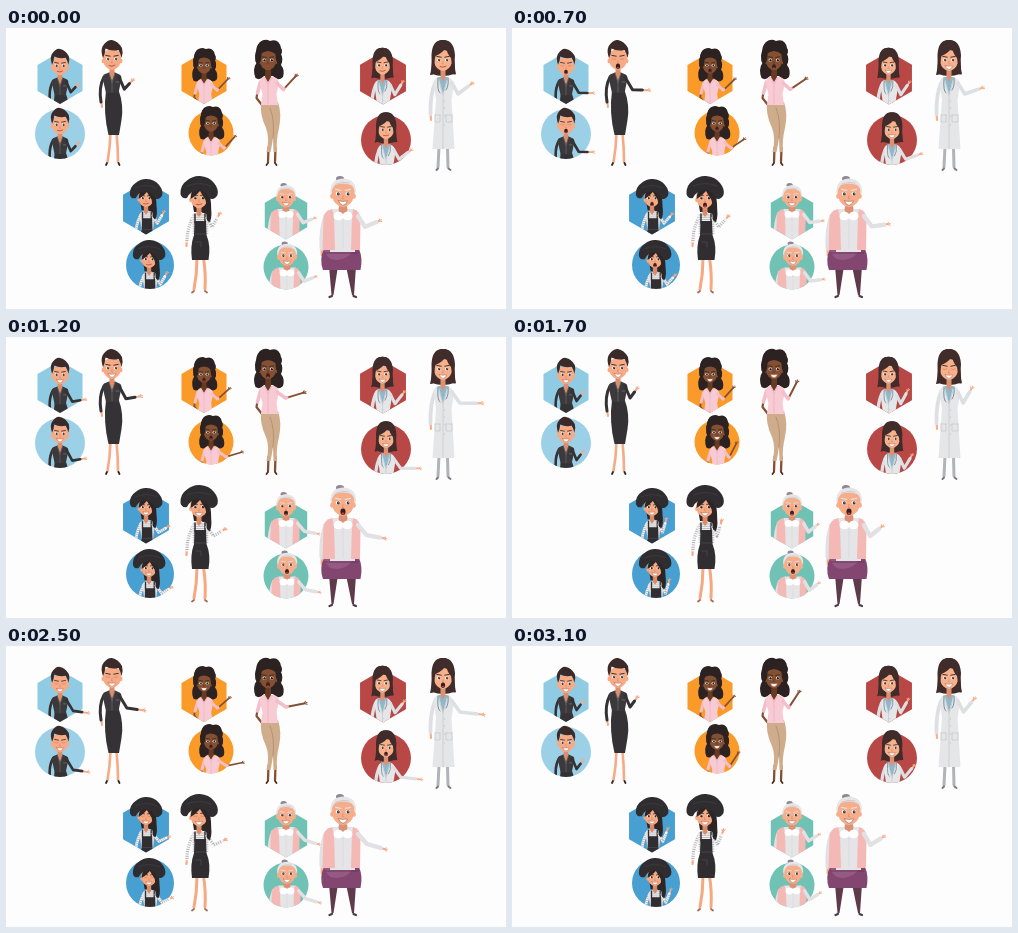
These frames come from a looping animation (500x281 px, 3200 ms). An HTML page with a canvas:

```html
<!DOCTYPE html>
<html lang="en">
<head>
<meta charset="utf-8">
<title>Character set</title>
<style>
  html, body { margin: 0; width: 100%; height: 100%; overflow: hidden; background: #fefdfe; }
  canvas { display: block; width: 500px; height: 281px; }
</style>
</head>
<body>
<canvas id="stage"></canvas>
<script>
const canvas = document.getElementById('stage');
const ctx = canvas.getContext('2d');
const ratio = Math.max(1, window.devicePixelRatio || 1);
canvas.width = 500 * ratio;
canvas.height = 281 * ratio;

const LOOP = 3200, STEP = 100, WAVE = 1500;
const DARK = '#2b282a';
const mix = (a, b, k) => a + (b - a) * k;
const mixPoint = (p, q, k) => [mix(p[0], q[0], k), mix(p[1], q[1], k)];
const within = (ranges, tick) => ranges.some(([from, to]) => tick >= from && tick <= to);

function fill(color, path) {
  ctx.fillStyle = color;
  ctx.fill(new Path2D(path));
}
function line(color, width, path, dash = []) {
  ctx.strokeStyle = color;
  ctx.lineWidth = width;
  ctx.lineCap = dash.length ? 'butt' : 'round';
  ctx.lineJoin = 'round';
  ctx.setLineDash(dash);
  ctx.stroke(new Path2D(path));
}
function oval(color, x, y, rx, ry = rx) {
  ctx.fillStyle = color;
  ctx.beginPath();
  ctx.ellipse(x, y, rx, ry, 0, 0, 7);
  ctx.fill();
}
function stripedLine(width, path) {
  line('#f3f3f5', width, path);
  line('#a5a4aa', width, path, [.7, 1.6]);
}

// Figures are drawn in stage coordinates; busts reuse them scaled about the head.
const people = [
  {
    head: [106, 32], scale: .88, skin: '#f6aa85', shade: '#dd8f6c', iris: '#4a3026',
    sleeve: '#343234', width: 3, cuff: .55, start: 150,
    arm: { shoulder: [113, 49], elbow: [[118, 61], [121, 62]], hand: [[126, 50], [140, 65.5]] },
    talk: [[6, 8], [21, 23]], blink: [[6, 7], [24, 25]],
    busts: [
      { shape: 'hex', x: 54, y: 50, r: 26, color: '#90cbe4', head: [54, 38.5] },
      { shape: 'circle', x: 54, y: 106, r: 25, color: '#9bd0e7', head: [54, 97.5] }
    ],
    back() {},
    body() {
      line(this.skin, 2, 'M95 72L96 79');
      line('#343234', 3, 'M98 49Q92.5 59 95 74');
      line(this.skin, 2.6, 'M104.5 105Q104 120 101.5 134M110.5 105Q112 120 112 134');
      line(DARK, 1.8, 'M101 135L100 137M112.5 135L113.5 137');
      fill('#343234', 'M100 63L112.5 62Q118 77 115.5 92L113 107H102.5Q97 84 100 63Z');
      fill('#3b393b', 'M103 44.5L98 46.5Q95.5 49 97.5 54L100 65L112.5 65L115 53Q116.5 48 113.5 46.5L109 44.5Z');
      fill(this.shade, 'M103.5 39H108.5V46L106 53L103.5 46Z');
      line('#777377', .6, 'M103 45L106 55L109 45M106 55V64');
      line('#8a8588', .6, 'M110 54H113');
    },
    hair() {
      fill('#3a2a29', 'M97 30Q94.5 23 96.5 18.5Q101 11 106 12Q112 13 116 20Q117.5 25 115.5 30Q114.5 25 112.5 22Q105 23.5 99.5 20.5Q99 26 97 30Z');
    }
  },
  {
    head: [262, 33], scale: .85, skin: '#855031', shade: '#673a21', iris: '#21130d',
    sleeve: '#f3bdca', width: 3.4, cuff: .06, start: 290, wide: .92,
    arm: { shoulder: [271, 55], elbow: [[276, 62], [280, 61]], hand: [[285, 43], [301, 57]] },
    talk: [[5, 13], [20, 27]], blink: [],
    busts: [
      { shape: 'hex', x: 198, y: 50, r: 26, color: '#fa9a29', head: [198, 38], reach: [.3, .45], talk: [[5, 13]] },
      { shape: 'circle', x: 205, y: 105, r: 22.5, color: '#fa9a29', head: [205, 96] }
    ],
    back() {
      fill('#2d2222', 'M263 13Q252 11 251 21Q247 28 251 34Q246 41 249.5 50Q254 53 258 48L267 48Q272 54 277 49Q279 42 275 37Q278 30 274 25Q274 12 263 13Z');
    },
    body() {
      line(this.skin, 2.2, 'M251.5 64L250.5 70L256 77');
      line('#f3bdca', 3.6, 'M254.5 54L251.5 65');
      line(this.skin, 2.3, 'M262.5 120L262 134M269.5 120L269 134');
      line('#4b2c1d', 1.8, 'M262 135L260.5 137M269 135L270.5 137');
      fill('#cfad8c', 'M255.5 74H272Q276 86 273 100Q270 112 271 124H267.5L267 110Q266 117 264.5 124H260.5Q264 110 260 100Q253 85 255.5 74Z');
      line('#aa866b', .7, 'M264 80Q269 92 267 110');
      fill('#f8cbd4', 'M257 49Q253 51 254 57L256.5 66L255 77H272L270.5 66L273 55Q272 50 268 49Z');
      fill(this.shade, 'M259.5 41H265V49L262 54L259 49Z');
      line('#e5aab8', .6, 'M258.5 49L262 56L266 49M262 56V76');
    },
    hair() {
      fill('#2d2222', 'M264 17Q258 20 255.5 26Q256 32 252.5 37Q247 33 250.5 27Q249 19 254 14Q259 10 264 13Q273 10 275 20Q277 23 275 27Q278 33 273 38Q269.5 33 269.5 27Q269 21 264 17Z');
    }
  },
  {
    head: [437, 33], scale: .87, skin: '#f8b08b', shade: '#de9170', iris: '#4b332b',
    sleeve: '#dedfe2', width: 3.6, cuff: .68, start: 290,
    arm: { shoulder: [446, 55], elbow: [[451, 66], [454, 66]], hand: [[460, 49], [479, 69]] },
    talk: [[24, 27]], blink: [[16, 17]],
    busts: [
      { shape: 'hex', x: 377, y: 50, r: 26.5, color: '#b84845', head: [376.5, 38], reach: [0, .15], talk: [], blink: [] },
      { shape: 'circle', x: 380, y: 112, r: 25, color: '#b84845', head: [380, 102.5], blink: [] }
    ],
    back() {
      fill('#402c2a', 'M437 12Q426 12 427 27Q425 40 426 46Q437 50 448 46Q450 39 447 27Q448 12 437 12Z');
    },
    body() {
      line(this.skin, 2.2, 'M424.5 84L425 92');
      line('#dedfe2', 3.8, 'M429 55Q424 67 424.5 86');
      line('#b0b3b7', 3, 'M433 119L432 139M441.5 119L442 139');
      line('#7c7a7e', 2, 'M432 140.5L430.5 142M442.5 140.5L444.5 142');
      fill('#e4e6e8', 'M432 49Q427 51 428 57L430 72L426.5 121H448.5L445.5 72L448 57Q447 51 442 49Z');
      fill('#8db9cc', 'M432.5 49H441.5L437 66Z');
      fill(this.shade, 'M434.5 42H439.5V49L437 54L434.5 49Z');
      line('#c0c0c5', .6, 'M432 50L437 67V121M442 50L437 67M429 87H434M440 87H446M429 87V94H434V87M440 87V94H446V87');
      line('#62788a', .8, 'M432 50Q431 64 434 65M442 50Q443 58 440 62');
      for (const y of [73, 80, 88, 97]) oval('#b5b5bb', 438.5, y, .5);
    },
    hair() {
      fill('#402c2a', 'M437 12Q426 12 425.5 27Q426 40 424 47Q429 47 430 42Q427.5 34 429.5 28Q437 25 440 19Q441 26 445 30Q446.5 37 444.5 43Q447 48 450 46Q448 38 449 27Q448 12 437 12Z');
    }
  },
  {
    head: [193, 171], scale: .87, skin: '#f6a880', shade: '#da8b67', iris: '#38241f',
    sleeve: '#f1f1f2', width: 3.2, cuff: .62, stripes: true, start: 290, wide: .94,
    arm: { shoulder: [201, 190], elbow: [[205, 199], [208, 199]], hand: [[209.5, 182], [221, 193]] },
    talk: [[6, 8], [21, 23]], blink: [[24, 25]],
    busts: [
      { shape: 'hex', x: 140, y: 180, r: 26.5, color: '#489fd1', head: [140, 171] },
      { shape: 'circle', x: 144, y: 237, r: 24, color: '#489fd1', head: [143, 232] }
    ],
    back() {
      fill('#2d2627', 'M184 160H203Q206 177 205 189L200 194L196 184H188Z');
    },
    body() {
      line(this.skin, 2.2, 'M181 211L180.5 218');
      stripedLine(3.2, 'M186.5 190Q181 201 181 213');
      line(this.skin, 3, 'M191 230Q191 246 188 261M197.5 230Q200 246 199 261');
      line('#a66a52', 1.8, 'M188 263L186 264.5M199 263L201 264.5');
      fill('#f1f1f2', 'M189 185Q184 187 186 194L188 207H201L203 191Q202 186 198 185Z');
      for (let y = 187; y < 207; y += 2.3) line('#a5a4aa', .7, `M187 ${y}H202`);
      fill('#302e30', 'M188.5 193H200L200.5 207Q205 218 202.5 232H186Q184 218 188 207Z');
      line('#302e30', 1.5, 'M189 186V195M199 186V195');
      line('#555156', .6, 'M189 206H200M190 214H195V219');
      fill(this.shade, 'M190.5 180H195.5V186L193 189L190.5 186Z');
    },
    hair() {
      fill('#2d2627', 'M185 167L187 159H199Q205 166 203.5 176Q207 187 204 194Q200 194 200.5 187Q201 178 199.5 172Q197 168 194 163Q190 168 184.5 171Z');
      fill('#302d30', 'M174.5 166Q174 157 181 152.5Q187 147.5 194 148Q203 148.5 208 155Q213 161 211.5 167Q208 173 203 170Q201 163 193 162Q185 162 181 170Q175.5 171 174.5 166Z');
      line('#454145', .7, 'M181 158Q193 153 205 158');
    }
  },
  {
    head: [337, 167], scale: .78, skin: '#f6ad8a', shade: '#dd9174', iris: '#4c393a',
    sleeve: '#e1e1e4', width: 4.4, cuff: .68, start: 290, wide: 1.22, old: true,
    arm: { shoulder: [352, 188], elbow: [[358, 199], [361, 198]], hand: [[371, 188], [381, 204]] },
    talk: [[11, 18]], blink: [[21, 22]],
    busts: [
      { shape: 'hex', x: 280, y: 187, r: 24.5, color: '#70c2b5', head: [280, 170] },
      { shape: 'circle', x: 280, y: 239, r: 22.5, color: '#70c2b5', head: [281, 228.5] }
    ],
    back() {
      oval('#8f8794', 334, 150.5, 4, 2.6);
      oval('#dddde0', 337, 163, 12.5, 12.5);
    },
    body() {
      line(this.skin, 2.8, 'M316 219V227');
      line('#e1e1e4', 5, 'M320 188Q315 201 316 220');
      fill('#5f3a4b', 'M323 238H332L327.5 267H325.5ZM340 238H350L348 267H346Z');
      line('#493b47', 2.2, 'M326 268L323.5 269M347.5 268L350 269');
      fill('#824670', 'M318 221H353Q357 230 354.5 242H317Q313 231 318 221Z');
      fill('#955a83', 'M318 222H347Q343 231 331 232Q321 232 318 222Z');
      line('#683457', .8, 'M319 225H352');
      fill('#e5e5e8', 'M326 181H348L349 224H324Z');
      fill('#f4b8b5', 'M326 181Q318 183 317.5 190L316.5 222H329L328 188Z');
      fill('#f4b8b5', 'M347 181Q354 183 354.5 190L354 222H345L346 188Z');
      oval(this.shade, 337, 181, 4.5, 5);
      oval('#fff', 332.5, 188, 5, 4.3);
      oval('#fff', 341.5, 188, 5, 4.3);
      line('#d4d4da', .6, 'M337 192V220');
    },
    hair() {
      fill('#e6e6e9', 'M325 166Q323 151 337 151Q351 151 350 166Q348 159 345 157Q337 154 329 157Q326 160 325 166Z');
      line('#b9b9c0', .6, 'M330 156Q337 153 343 155');
    }
  }
];

function drawArm(person, swing) {
  const { shoulder, elbow: elbows, hand: hands } = person.arm;
  const elbow = mixPoint(...elbows, swing);
  const bulge = 5 * swing * (1 - swing);
  const tip = mixPoint(...hands, swing);
  tip[0] += bulge;
  tip[1] -= bulge;
  const angle = Math.atan2(tip[1] - elbow[1], tip[0] - elbow[0]);
  const palm = [tip[0] - 3 * Math.cos(angle), tip[1] - 3 * Math.sin(angle)];
  const cuff = mixPoint(elbow, tip, person.cuff);
  line(person.skin, 2, `M${elbow}L${palm}`);
  for (const turn of [-.75, -.1, .45]) {
    const reach = turn < -.5 ? 2.4 : 3.2;
    line(person.skin, 1.1,
      `M${palm}l${reach * Math.cos(angle + turn)} ${reach * Math.sin(angle + turn)}`);
  }
  const sleeve = `M${shoulder}L${elbow}L${cuff}`;
  if (person.stripes) stripedLine(person.width, sleeve);
  else line(person.sleeve, person.width, sleeve);
}

function drawFace(person, talking, blinking, smirking) {
  ctx.save();
  ctx.translate(...person.head);
  ctx.scale(person.wide || 1, person.wide || 1);
  oval(person.skin, -9, 1, 1.5, 2.3);
  oval(person.skin, 9, 1, 1.5, 2.3);
  fill(person.skin, 'M-9-7Q0-15 9-7Q10 3 6 7Q0 13-6 7Q-10 3-9-7Z');
  for (const side of [-1, 1]) {
    const x = side * 4;
    if (blinking) line(person.shade, 1, `M${x - 2}-1q2 1.3 4 0`);
    else {
      oval('#fff', x, -1, 1.9, 1.7);
      oval(person.iris, x + .2, -.9, 1.2, 1.4);
      oval('#fff', x + .6, -1.4, .3);
    }
    line(person.old ? '#e3dfe0' : DARK, .9,
      `M${x - 2.2 * side}-3.8L${x + 2.2 * side}-4.6`);
  }
  line(person.shade, .8, 'M0 .5L-.5 3H.7');
  if (talking) {
    oval('#391d20', 0, 6.3, 2.1, 2.7);
    oval('#b94f50', 0, 7.8, 1.2, .8);
  } else if (smirking) line('#a64943', .9, 'M-3 5.6Q0 7.2 3 5.2');
  else {
    const smile = 'M-3.7 4.8Q0 5.7 3.7 4.8Q2.5 8.4 0 8.4Q-2.5 8.4-3.7 4.8Z';
    fill('#fff', smile);
    line('#a86153', .5, smile);
  }
  ctx.restore();
}

function drawHead(person, state, tick) {
  drawFace(person, within(state.talk || person.talk, tick),
    within(state.blink || person.blink, tick), tick < 3 && !person.old);
  person.hair();
}

function badgePath({ shape, x, y, r }) {
  const path = new Path2D();
  if (shape === 'circle') path.arc(x, y, r, 0, 7);
  else {
    for (let i = 0; i < 6; i++) {
      const a = (i * 60 - 90) * Math.PI / 180;
      path.lineTo(x + r * Math.cos(a), y + r * Math.sin(a));
    }
    path.closePath();
  }
  return path;
}

function drawBust(person, bust, swing, tick) {
  const badge = badgePath(bust);
  ctx.fillStyle = bust.color;
  ctx.fill(badge);
  const place = () => {
    ctx.translate(...bust.head);
    ctx.scale(person.scale, person.scale);
    ctx.translate(-person.head[0], -person.head[1]);
  };
  ctx.save();
  const clip = new Path2D(badge);
  clip.rect(bust.x - 50, bust.y - 50, 100, 50);
  ctx.clip(clip);
  place();
  person.back();
  person.body();
  ctx.restore();
  ctx.save();
  place();
  drawArm(person, bust.reach ? mix(...bust.reach, swing) : swing);
  drawHead(person, bust, tick);
  ctx.restore();
}

function draw(time) {
  const tick = Math.floor((time % LOOP) / STEP);
  ctx.setTransform(ratio, 0, 0, ratio, 0, 0);
  ctx.fillStyle = '#fefdfe';
  ctx.fillRect(0, 0, 500, 281);
  for (const person of people) {
    const phase = 2 * Math.PI * (tick * STEP - person.start) / WAVE;
    const swing = (1 - Math.cos(phase)) / 2;
    for (const bust of person.busts) drawBust(person, bust, swing, tick);
    person.back();
    person.body();
    drawArm(person, swing);
    drawHead(person, person, tick);
  }
}

const begin = performance.now();
function frame() {
  draw(performance.now() - begin);
  requestAnimationFrame(frame);
}
frame();
</script>
</body>
</html>
```
